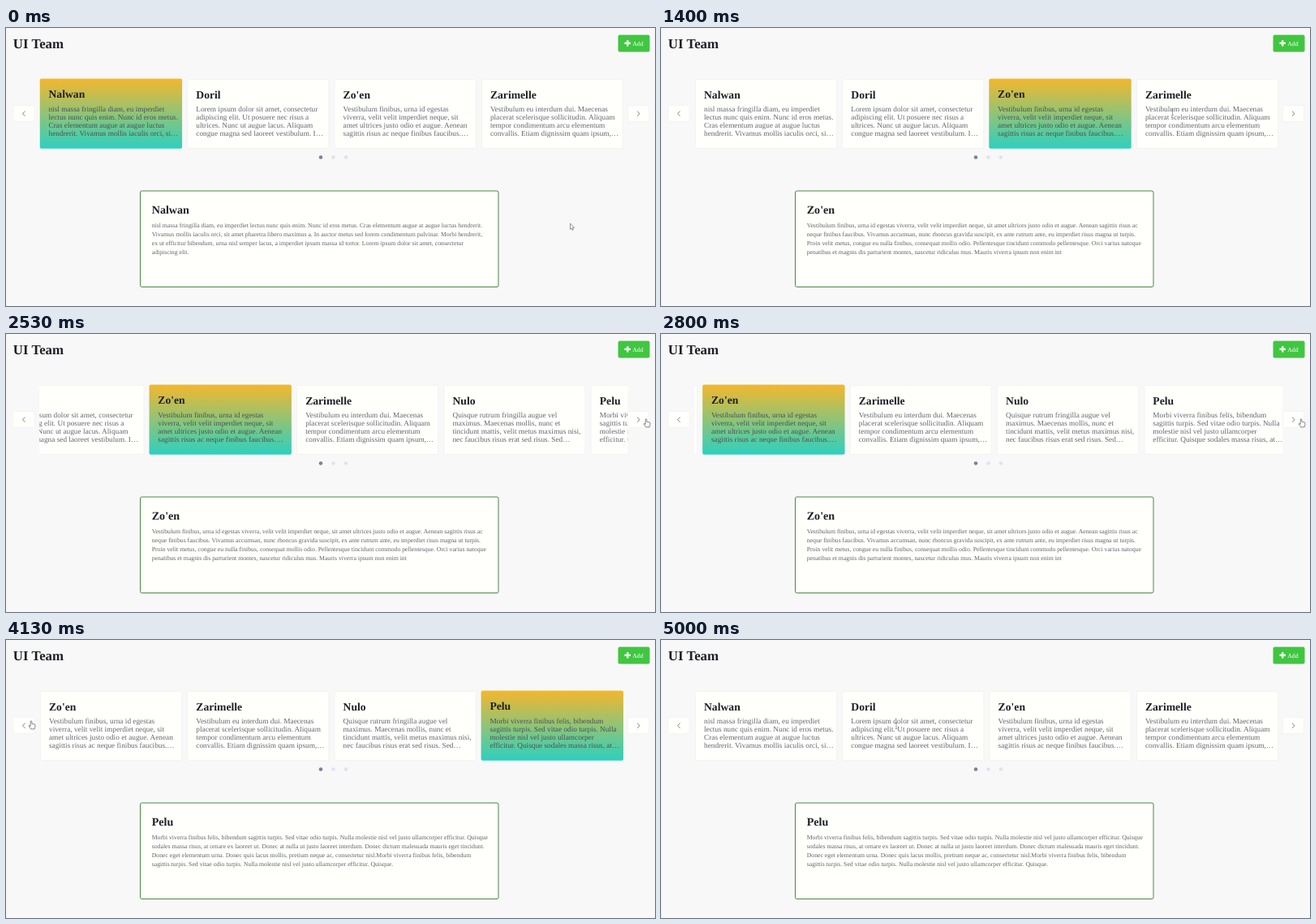
These frames come from a looping animation (800x343 px, 5070 ms). An HTML page with a canvas:

```html
<!DOCTYPE html>
<html lang="en">
<head>
<meta charset="utf-8">
<title>UI Team</title>
<style>
  html, body { margin: 0; width: 100%; height: 100%; overflow: hidden; background: #f8f8f8; }
  canvas { display: block; width: 800px; height: 343px; }
</style>
</head>
<body>
<canvas id="stage"></canvas>
<script>
const LOOP = 5070, FPS = 15, PITCH = 181.3, SLIDE = 500;
const SERIF = '"Liberation Serif", "Times New Roman", serif';

const people = [
  { name: 'Nalwan',
    lines: ['nisl massa fringilla diam, eu imperdiet', 'lectus nunc quis enim. Nunc id eros metus.',
      'Cras elementum augue at augue luctus', 'hendrerit. Vivamus mollis iaculis orci, si…'],
    bio: ['nisl massa fringilla diam, eu imperdiet lectus nunc quis enim. Nunc id eros metus. Cras elementum augue at augue luctus hendrerit.',
      'Vivamus mollis iaculis orci, sit amet pharetra libero maximus a. In auctor metus sed lorem condimentum pulvinar. Morbi hendrerit,',
      'ex ut efficitur bibendum, urna nisl semper lacus, a imperdiet ipsum massa id tortor. Lorem ipsum dolor sit amet, consectetur',
      'adipiscing elit.'] },
  { name: 'Doril',
    lines: ['Lorem ipsum dolor sit amet, consectetur', 'adipiscing elit. Ut posuere nec risus a',
      'ultrices. Nunc ut augue lacus. Aliquam', 'congue magna sed laoreet vestibulum. I…'] },
  { name: "Zo'en",
    lines: ['Vestibulum finibus, urna id egestas', 'viverra, velit velit imperdiet neque, sit',
      'amet ultrices justo odio et augue. Aenean', 'sagittis risus ac neque finibus faucibus.…'],
    bio: ['Vestibulum finibus, urna id egestas viverra, velit velit imperdiet neque, sit amet ultrices justo odio et augue. Aenean sagittis risus ac',
      'neque finibus faucibus. Vivamus accumsan, nunc rhoncus gravida suscipit, ex ante rutrum ante, eu imperdiet risus magna ut turpis.',
      'Proin velit metus, congue eu nulla finibus, consequat mollis odio. Pellentesque tincidunt commodo pellentesque. Orci varius natoque',
      'penatibus et magnis dis parturient montes, nascetur ridiculus mus. Mauris viverra ipsum non enim int'] },
  { name: 'Zarimelle',
    lines: ['Vestibulum eu interdum dui. Maecenas', 'placerat scelerisque sollicitudin. Aliquam',
      'tempor condimentum arcu elementum', 'convallis. Etiam dignissim quam ipsum,…'] },
  { name: 'Nulo',
    lines: ['Quisque rutrum fringilla augue vel', 'maximus. Maecenas mollis, nunc et',
      'tincidunt mattis, velit metus maximus nisi,', 'nec faucibus risus erat sed risus. Sed…'] },
  { name: 'Pelu',
    lines: ['Morbi viverra finibus felis, bibendum', 'sagittis turpis. Sed vitae odio turpis. Nulla',
      'molestie nisl vel justo ullamcorper', 'efficitur. Quisque sodales massa risus, at…'],
    bio: ['Morbi viverra finibus felis, bibendum sagittis turpis. Sed vitae odio turpis. Nulla molestie nisl vel justo ullamcorper efficitur. Quisque',
      'sodales massa risus, at ornare ex laoreet ut. Donec at nulla ut justo laoreet interdum. Donec dictum malesuada mauris eget tincidunt.',
      'Donec eget elementum urna. Donec quis lacus mollis, pretium neque ac, consectetur nisl.Morbi viverra finibus felis, bibendum',
      'sagittis turpis. Sed vitae odio turpis. Nulla molestie nisl vel justo ullamcorper efficitur. Quisque.'] }
];

// [time, value]
const slides = [[1975.5, 1], [2441.5, 2], [4190, 1], [4450, 0]];
const picks = [[0, 0], [1195, 2], [3060, 5]];
const details = [[0, 0], [1328, 2], [3195, 5]];
// [time, x, y]
const pointer = [
  [0, 695.5, 241], [267, 695.5, 241], [800, 472, 103], [1133, 472, 103],
  [1667, 789, 104.7], [2800, 789, 104.7], [3067, 701, 106], [3333, 701, 106],
  [3800, 31, 99.7], [4530, 31, 99.7], [4930, 290, 106], [LOOP, 290, 106]
];

const canvas = document.getElementById('stage');
const ctx = canvas.getContext('2d');
const dpr = window.devicePixelRatio || 1;
canvas.width = 800 * dpr;
canvas.height = 343 * dpr;

const clamp = v => Math.min(1, Math.max(0, v));
const smooth = v => v * v * (3 - 2 * v);
const latest = (list, t) => list.filter(k => k[0] <= t).pop()[1];

// CSS "ease": cubic-bezier(.25, .1, .25, 1)
function ease(x) {
  const bez = (a, b, s) => 3 * (1 - s) ** 2 * s * a + 3 * (1 - s) * s * s * b + s ** 3;
  let lo = 0, hi = 1;
  for (let i = 0; i < 24; i++) {
    const mid = (lo + hi) / 2;
    if (bez(.25, .25, mid) < x) lo = mid; else hi = mid;
  }
  return bez(.1, 1, lo);
}

function slideAt(t) {
  let pos = 0;
  slides.forEach(([start, to], i) => {
    if (t <= start) return;
    const end = i + 1 < slides.length ? Math.min(t, slides[i + 1][0]) : t;
    pos += (to - pos) * ease(clamp((end - start) / SLIDE));
  });
  return pos * PITCH;
}

function pointerAt(t) {
  const i = Math.max(1, pointer.findIndex(k => k[0] >= t));
  const [t0, x0, y0] = pointer[i - 1], [t1, x1, y1] = pointer[i];
  const p = smooth(clamp((t - t0) / (t1 - t0)));
  return [x0 + (x1 - x0) * p, y0 + (y1 - y0) * p];
}

function box(x, y, w, h, r, fill, stroke) {
  ctx.beginPath();
  ctx.roundRect(x, y, w, h, r);
  ctx.fillStyle = fill;
  ctx.fill();
  if (stroke) {
    ctx.strokeStyle = stroke;
    ctx.lineWidth = 1;
    ctx.stroke();
  }
}

function text(str, x, y, size, color, bold) {
  ctx.font = `${bold ? 'bold ' : ''}${size}px ${SERIF}`;
  ctx.fillStyle = color;
  ctx.fillText(str, x, y);
}

function path(points, close) {
  ctx.beginPath();
  points.forEach(([x, y]) => ctx.lineTo(x, y));
  if (close) ctx.closePath();
}

function dot(x, color) {
  ctx.beginPath();
  ctx.arc(x, 159.5, 2.3, 0, Math.PI * 2);
  ctx.fillStyle = color;
  ctx.fill();
}

function card(person, x, active) {
  if (active) {
    const fill = ctx.createLinearGradient(0, 63, 0, 149);
    fill.addColorStop(0, '#f2b72e');
    fill.addColorStop(1, '#2dd0c0');
    box(x - .3, 62.6, 175.4, 86.2, 2, fill);
  } else {
    box(x + .5, 63.5, 174, 85, 2, '#fffffc', '#f3f3f2');
  }
  const dx = active ? -.5 : 0;
  text(person.name, x + 11 + dx, active ? 86.4 : 86.9, 13.65, '#1d2126', true);
  person.lines.forEach((line, i) =>
    text(line, x + 11 + dx, 102.8 + i * 10.2, 9.27, active ? '#475156' : '#63676d'));
}

function arrowButton(x, dir) {
  box(x + .5, 95.5, 26, 20, 1.5, '#fffffc', '#f4f4f3');
  const cx = x + 13.5;
  path([[cx - 1.5 * dir, 102.7], [cx + 1.6 * dir, 105.7], [cx - 1.5 * dir, 108.7]]);
  ctx.strokeStyle = '#7d8084';
  ctx.lineWidth = 1;
  ctx.stroke();
}

function outline(width = .8) {
  ctx.fillStyle = '#fff';
  ctx.fill();
  ctx.strokeStyle = '#66696d';
  ctx.lineWidth = width;
  ctx.stroke();
}

function drawPointer(x, y, shift) {
  const inStrip = x > 42 && x < 760;
  const overText = inStrip && y > 95 && y < 135 && (x - 42 + shift) % PITCH < 165;
  const overButton = y > 95 && y < 116 && (x > 8 && x < 36 || x > 766 && x < 794);
  ctx.save();
  ctx.translate(x, y);
  if (overText) {
    path([[-1.3, -3.8], [0, -3.4], [1.3, -3.8]]);
    ctx.moveTo(0, -3.4);
    ctx.lineTo(0, 3.4);
    ctx.moveTo(-1.3, 3.8);
    ctx.lineTo(0, 3.4);
    ctx.lineTo(1.3, 3.8);
    ctx.strokeStyle = '#5c5f63';
    ctx.lineWidth = .6;
    ctx.stroke();
  } else if (overButton) {
    path([[-.8, .6], [0, 0], [.9, .6], [.9, 3.6], [4.5, 4.4], [5, 5.4], [4.8, 8], [4, 10.2],
      [-.2, 10.2], [-2.8, 6.4], [-2.4, 5.6], [-.8, 6.6]], true);
    outline();
  } else {
    path([[0, 0], [0, 7.4], [1.6, 6], [2.7, 8.5], [3.8, 8], [2.8, 5.6], [4.9, 5.4]], true);
    outline(.7);
  }
  ctx.restore();
}

function draw(t) {
  const shift = slideAt(t), active = latest(picks, t), shown = people[latest(details, t)];
  ctx.setTransform(dpr, 0, 0, dpr, 0, 0);
  ctx.textRendering = 'geometricPrecision';
  ctx.letterSpacing = '0.005px'; // keeps "fi" unligated
  ctx.fillStyle = '#f8f8f8';
  ctx.fillRect(0, 0, 800, 343);
  ctx.fillStyle = '#f1f1f1';
  ctx.fillRect(0, 0, 1, 343);

  text('UI Team', 8.8, 25, 16.85, '#1d2126', true);
  box(754.5, 8.5, 39, 21, 2, '#41c641');
  ctx.fillStyle = '#fff';
  ctx.fillRect(762.5, 17.6, 7.4, 2.4);
  ctx.fillRect(765, 15.1, 2.4, 7.4);
  text('Add', 772.2, 21.6, 7.8, '#fff');

  ctx.save();
  ctx.beginPath();
  ctx.rect(41.2, 60, 725, 92);
  ctx.clip();
  people.forEach((person, i) => {
    const x = 42 + i * PITCH - shift;
    if (x > -140 && x < 770) card(person, x, i === active);
  });
  ctx.restore();

  arrowButton(8.5, -1);
  arrowButton(766, 1);
  dot(388, '#7c8097');
  dot(403.5, '#e0e3ee');
  dot(419, '#e0e3ee');

  box(165.5, 201, 441.5, 118.5, 2, '#fffffc', '#4c8646');
  text(shown.name, 179.7, 229, 14.1, '#1d2126', true);
  shown.bio.forEach((line, i) => text(line, 179.7, 246.1 + i * 11, 7.74, '#606469'));

  drawPointer(...pointerAt(t), shift);
}

function tick(now) {
  const t = now % LOOP;
  draw(Math.floor((t + 5) * FPS / 1000) * 1000 / FPS);
  requestAnimationFrame(tick);
}
draw(0);
requestAnimationFrame(tick);
</script>
</body>
</html>
```
